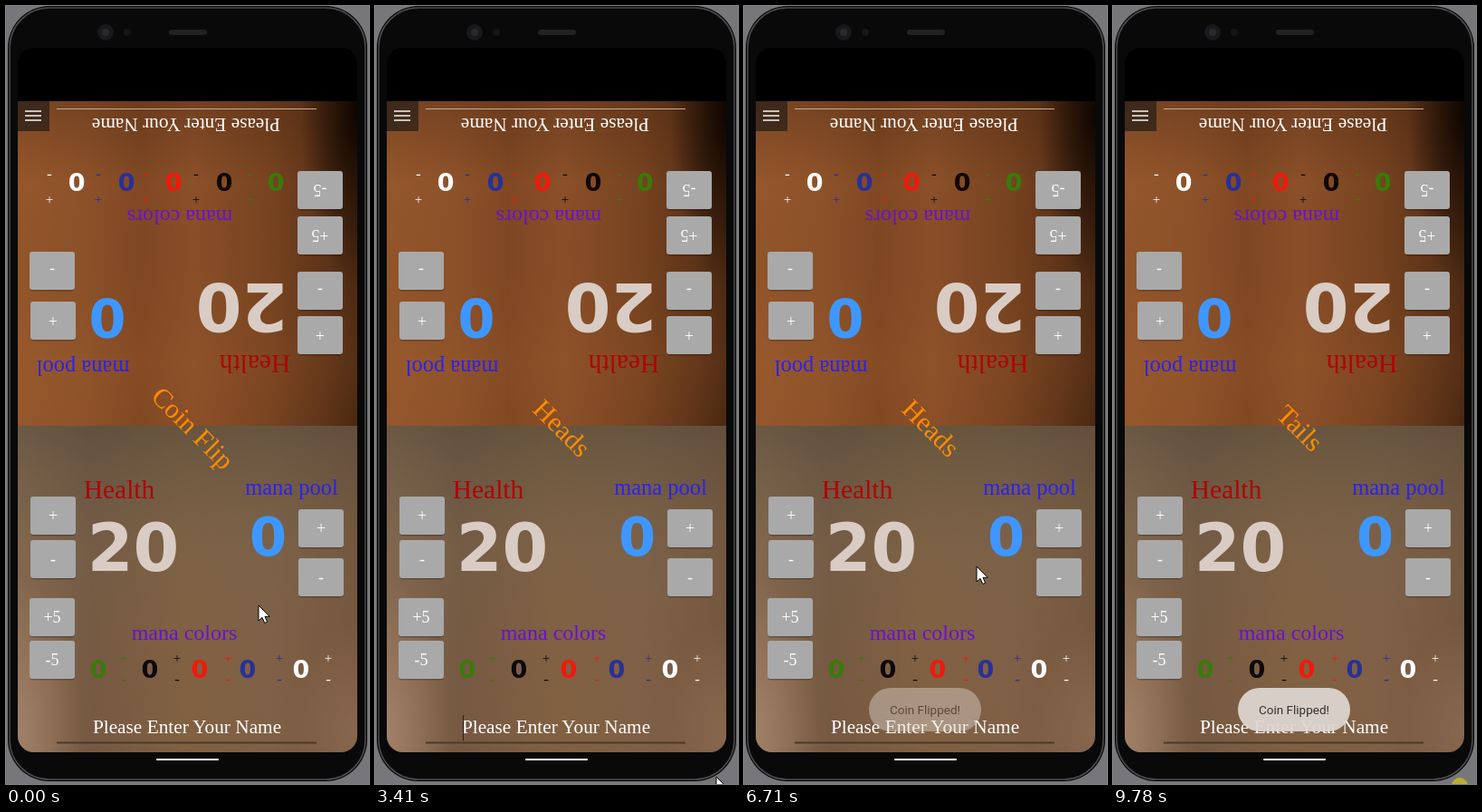
Animation of 401x858 px, one loop 9.9 s. Source, as an HTML page:

```html
<!DOCTYPE html>
<html lang="en">
<head>
<meta charset="utf-8">
<title>Life counter coin flip</title>
<style>
  html, body { margin: 0; width: 100%; height: 100%; overflow: hidden; background: #77777b; }
  svg { display: block; width: 100vw; height: 100vh; }
  text { font-family: "Liberation Serif", serif; text-anchor: middle; }
  .num { font-family: "DejaVu Sans", sans-serif; font-weight: bold; }
  .toast { font-family: Roboto, sans-serif; }
</style>
</head>
<body>
<svg viewBox="0 0 401 858">
  <defs>
    <linearGradient id="wood">
      <stop offset="0" stop-color="#95572b"/>
      <stop offset=".2" stop-color="#8d522a"/>
      <stop offset=".36" stop-color="#804823"/>
      <stop offset=".52" stop-color="#8b5029"/>
      <stop offset=".75" stop-color="#774320"/>
      <stop offset=".9" stop-color="#5e3419"/>
      <stop offset="1" stop-color="#4a2812"/>
    </linearGradient>
    <linearGradient id="top" x2="0" y2="1">
      <stop offset="0" stop-color="#2a1408" stop-opacity=".25"/>
      <stop offset=".25" stop-color="#2a1408" stop-opacity="0"/>
      <stop offset=".8" stop-color="#a8622e" stop-opacity=".12"/>
      <stop offset="1" stop-color="#a8622e" stop-opacity="0"/>
    </linearGradient>
    <radialGradient id="dark">
      <stop offset="0" stop-color="#080200" stop-opacity=".9"/>
      <stop offset=".4" stop-color="#120700" stop-opacity=".6"/>
      <stop offset="1" stop-color="#120700" stop-opacity="0"/>
    </radialGradient>
    <linearGradient id="low">
      <stop offset="0" stop-color="#86694e"/>
      <stop offset=".22" stop-color="#715640"/>
      <stop offset=".5" stop-color="#80603f"/>
      <stop offset=".75" stop-color="#7d5f45"/>
      <stop offset="1" stop-color="#705139"/>
    </linearGradient>
    <linearGradient id="haze" x2="0" y2="1">
      <stop offset="0" stop-color="#584d3d" stop-opacity=".6"/>
      <stop offset=".4" stop-color="#7a664f" stop-opacity=".35"/>
      <stop offset="1" stop-color="#8a6246" stop-opacity=".2"/>
    </linearGradient>
    <radialGradient id="glow">
      <stop offset="0" stop-color="#b3917a" stop-opacity=".6"/>
      <stop offset="1" stop-color="#b3917a" stop-opacity="0"/>
    </radialGradient>
    <clipPath id="screen"><path d="M13 105H388V805a18 18 0 0 1-18 18H31a18 18 0 0 1-18-18z"/></clipPath>
  </defs>

  <rect width="401" height="858" fill="#77777b"/>
  <rect x="2" y="0" width="397" height="855" rx="46" fill="#050505"/>
  <rect x="4" y="2" width="393" height="851" rx="44" fill="#09090a" stroke="#4b4b4e" stroke-width="1.5"/>
  <rect x="13" y="46" width="375" height="777" rx="18"/>
  <circle cx="110" cy="29" r="9" fill="#19191b"/>
  <circle cx="110" cy="29" r="4" fill="#292930"/>
  <circle cx="134" cy="29" r="4" fill="#151517"/>
  <rect x="180" y="26" width="42" height="6" rx="3" fill="#222224"/>

  <g clip-path="url(#screen)">
    <rect x="13" y="105" width="375" height="358" fill="url(#wood)"/>
    <rect x="13" y="105" width="375" height="358" fill="url(#top)"/>
    <ellipse cx="388" cy="120" rx="62" ry="190" fill="url(#dark)"/>
    <rect x="13" y="463" width="375" height="360" fill="url(#low)"/>
    <rect x="13" y="463" width="375" height="360" fill="url(#haze)"/>
    <ellipse cx="13" cy="800" rx="70" ry="170" fill="url(#glow)"/>
    <ellipse cx="388" cy="800" rx="70" ry="120" fill="url(#glow)" opacity=".5"/>
  </g>

  <rect x="13" y="105" width="35" height="33" fill="#30221a" opacity=".8"/>
  <path d="M21 116h18M21 121h18M21 126h18" stroke="#c9c2bd" stroke-width="2"/>
  <path d="M56 113.5H343" stroke="#c5ab96"/>
  <path d="M56 812.5H343" stroke="#4b3a2f" stroke-width="2"/>
  <rect x="166" y="830" width="69" height="2" rx="1" fill="#fff"/>

  <g id="board"></g>
  <rect id="press" x="170" y="430" width="77" height="48" fill="#fff"/>
  <text id="coin" transform="translate(205 467) rotate(45)" y="8" font-size="30" fill="#ff8c00"></text>
  <path id="caret" d="M97.5 782V810" stroke="#2b201a"/>
  <g id="toast">
    <rect x="138" y="752" width="124" height="48" rx="24" fill="#ded7d1" opacity=".93"/>
    <text class="toast" x="200" y="781" font-size="13.5" fill="#37302c">Coin Flipped!</text>
  </g>
  <path id="cursor" d="M0 0V17L4 13.4 6.8 19.5 9.6 18.3 7 12.3H12.2z" fill="#fff" stroke="#000"/>
  <circle id="spot" cx="383" cy="860" r="9" fill="#b9ad36"/>
</svg>
<script>
const LOOP = 9900, STEP = 110;
const $ = id => document.getElementById(id);
const board = $("board");
const GREEN = "#397a0a", BLACK = "#0d0706", RED = "#f2180b", NAVY = "#28309a", WHITE = "#fff";

function add(tag, attrs, content = "") {
  const el = document.createElementNS("http://www.w3.org/2000/svg", tag);
  for (const key in attrs) el.setAttribute(key, attrs[key]);
  el.textContent = content;
  board.append(el);
}

// The point is the baseline centre; turned text faces the player opposite.
function label(str, x, y, size, fill, turned, cls = "") {
  add("text", { transform: `translate(${x} ${y}) rotate(${turned ? 180 : 0})`,
    "font-size": size, fill, class: cls }, str);
}

function button(str, x, y, turned) {
  add("rect", { x, y: y + 1.5, width: 50, height: 42, rx: 4, fill: "#000", opacity: .25 });
  add("rect", { x, y, width: 50, height: 42, rx: 3, fill: "#a9a9a9" });
  label(str, x + 25, y + (turned ? 15 : 27), 18, WHITE, turned);
}

function mana(fill, x, signX, turned) {
  label("0", x, turned ? 184 : 741, 27, fill, turned, "num");
  label("+", signX, turned ? 209 : 724, 15, fill, turned);
  label("-", signX, turned ? 182 : 748, 17, fill, turned);
}

const title = "Please Enter Your Name";
label(title, 199, 124, 21.3, WHITE, true);
label("mana colors", 192, 225, 24, "#6a10d2", true);
label("20", 260.5, 306, 73, "#d9ccc4", true, "num");
label("Health", 275, 385, 29.5, "#ae0505", true);
label("0", 112, 323, 59, "#3e97ff", true, "num");
label("mana pool", 85, 391, 24.5, "#2b22ee", true);

label("Health", 125, 543, 29.5, "#ae0505");
label("20", 140.5, 623, 73, "#d9ccc4", false, "num");
label("mana pool", 315.5, 539, 24.5, "#2b22ee");
label("0", 289.5, 606, 59, "#3e97ff", false, "num");
label("mana colors", 197, 699, 24, "#6a10d2");
label(title, 200, 802, 21.3, WHITE);

[[WHITE, 78, 48], [NAVY, 133, 102], [RED, 185, 155], [BLACK, 241, 210], [GREEN, 298, 270]]
  .forEach(m => mana(...m, true));
[[GREEN, 102, 130], [BLACK, 159, 189], [RED, 214, 245], [NAVY, 267, 302], [WHITE, 326, 356]]
  .forEach(m => mana(...m, false));

[["-5", 322, 182], ["+5", 322, 232], ["-", 322, 293], ["+", 322, 342], ["-", 26, 271], ["+", 27, 326]]
  .forEach(b => button(...b, true));
[["+", 27, 541], ["-", 27, 589], ["+5", 26, 653], ["-5", 26, 700], ["+", 323, 555], ["-", 323, 609]]
  .forEach(b => button(...b, false));

const clicks = [730, 4330, 7690];
const blinks = [100, 660, 1150, 1660, 2210, 2640, 3190, 3700, 4200, 4690,
  5170, 5720, 6150, 6710, 7160, 7690, 8250, 8680, 9230, 9780];
// Pointer path: time, x, y
const path = [
  [0, 279, 661], [40, 279, 661], [430, 208, 464], [760, 208, 464], [1310, 196, 559],
  [2860, 196, 559], [3400, 377, 850], [3510, 377, 850], [3840, 292, 533],
  [4170, 208, 462], [4390, 208, 462], [4720, 259, 627], [6090, 259, 627],
  [6700, 257, 618], [7040, 257, 618], [7470, 209, 462], [7700, 209, 462],
  [8240, 245, 581], [8900, 245, 581], [9670, 383, 860], [LOOP, 383, 860]
];
const clamp = v => Math.max(0, Math.min(1, v));

function pointer(t) {
  const i = path.findIndex(p => p[0] > t);
  const [t0, x0, y0] = path[i - 1], [t1, x1, y1] = path[i];
  const k = (t - t0) / (t1 - t0);
  return [x0 + (x1 - x0) * k, y0 + (y1 - y0) * k];
}

function draw() {
  const now = performance.now() % LOOP;
  const t = now < 100 ? 0 : 100 + Math.floor((now - 100) / STEP) * STEP;
  const since = t - (clicks.filter(c => c <= t).pop() ?? -LOOP);
  const shown = since - 240;

  $("cursor").setAttribute("transform", `translate(${pointer(t)})`);
  $("press").setAttribute("opacity", .18 * clamp((560 - since) / 170));
  $("toast").setAttribute("opacity", Math.min(clamp(shown / 200), clamp((2250 - shown) / 250)));
  $("coin").textContent = t < clicks[0] + 100 ? "Coin Flip" : t < clicks[2] + 100 ? "Heads" : "Tails";
  $("caret").setAttribute("opacity", blinks.filter(b => b <= now).length % 2);
  $("spot").setAttribute("opacity", now >= 9780 ? 1 : 0);
  requestAnimationFrame(draw);
}
draw();
</script>
</body>
</html>
```
